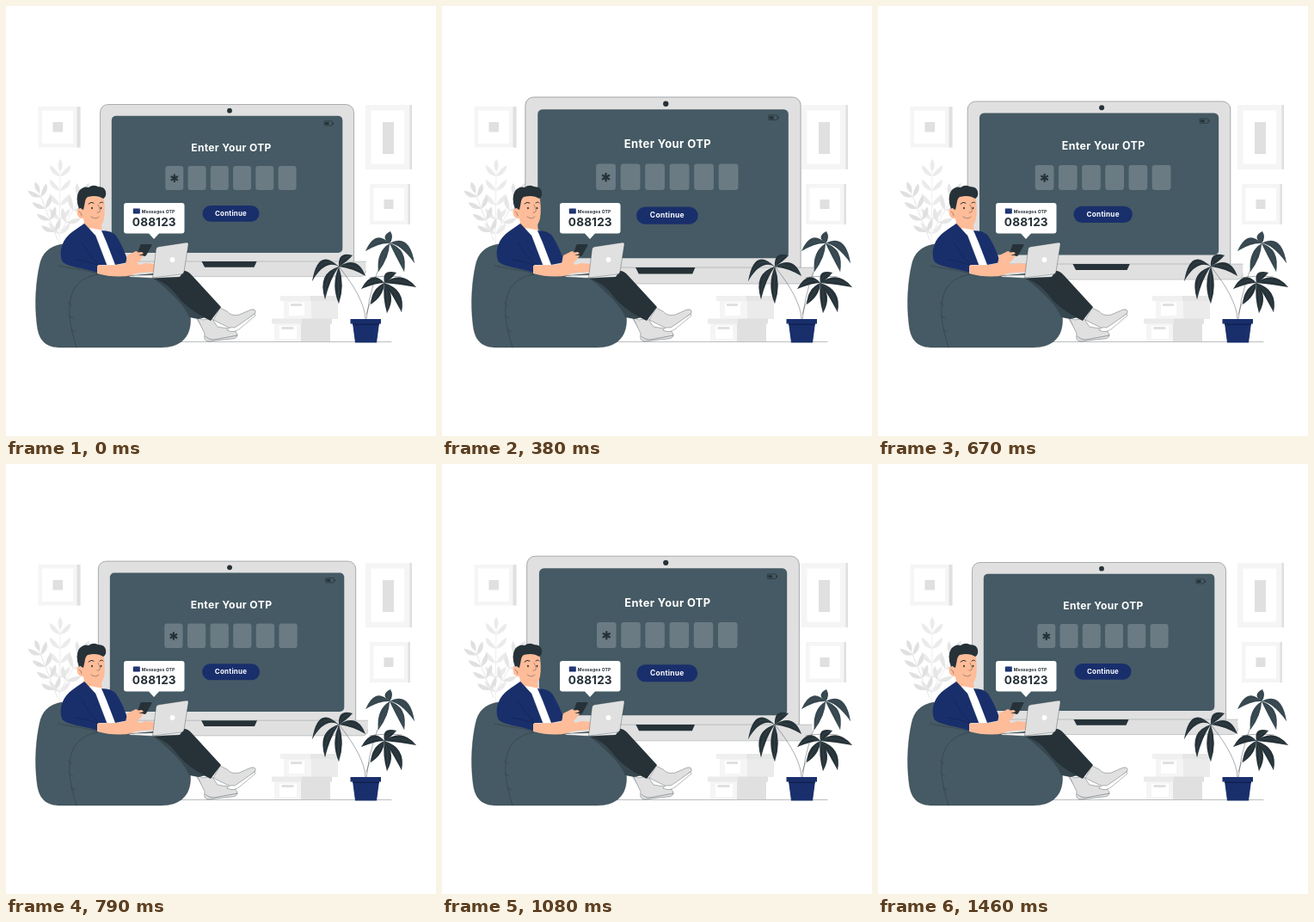
An HTML page for the animation above (1.5 s loop, 500 px wide and 500 px high).

```html
<!DOCTYPE html>
<html lang="en">
<head>
<meta charset="utf-8">
<title>Enter Your OTP</title>
<style>
html, body { margin: 0; width: 100%; height: 100%; overflow: hidden; background: #fff; }
svg { display: block; width: 100%; height: 100%; }
text { font-family: Inter, "Open Sans", sans-serif; font-weight: 700; text-anchor: middle; }
.line { fill: none; stroke: #263238; stroke-width: .4; stroke-linecap: round; stroke-linejoin: round; }
.skin { fill: #ffbc99; }
.navy { fill: #192f6c; }
.shoe { fill: #e0e0e0; stroke: #263238; stroke-width: .35; }
</style>
</head>
<body>
<svg viewBox="0 0 500 500">
  <g id="frames"></g>
  <g id="palePlant"></g>

  <!-- storage boxes -->
  <g>
    <path fill="#f5f5f5" d="M323 342H355V364H323Z"/>
    <path fill="#ebebeb" d="M355 342H386V364H355Z"/>
    <path fill="#f0f0f0" d="M319 337H354V343H319Z"/>
    <path fill="#e6e6e6" d="M354 337H387V343H354Z"/>
    <path fill="#fff" d="M329 345H347V360H329Z"/>
    <path fill="#e0e0e0" d="M331 346H344V349H331Z"/>
    <path fill="#f5f5f5" d="M312 369H343V390H312Z"/>
    <path fill="#e0e0e0" d="M343 369H377V390H343Z"/>
    <path fill="#ebebeb" d="M309 363.500H344V369.500H309Z"/>
    <path fill="#e0e0e0" d="M344 363.500H379V369.500H344Z"/>
    <path fill="#fff" d="M318 372H338V387H318Z"/>
    <path fill="#e0e0e0" d="M320.500 373H334.500V376H320.500Z"/>
  </g>
  <path class="line" d="M45 390.500H448" opacity=".8"/>

  <!-- big laptop -->
  <g id="screen">
    <rect x="109.500" y="114.500" width="295" height="190" rx="9" fill="#e0e0e0" stroke="#263238" stroke-width=".35"/>
    <rect x="122.800" y="127.700" width="268.500" height="159.300" rx="5" fill="#455a64"/>
    <circle cx="260" cy="121.700" r="2.900" fill="#263238"/>
    <rect x="370" y="133.800" width="9.500" height="5.200" rx="1" fill="none" stroke="#263238" stroke-width=".7"/>
    <path d="M371 135H375.500V138H371ZM380 135.500H381V137.500H380Z" fill="#263238"/>
    <text x="262" y="169" font-size="12" letter-spacing=".35" fill="#fff">Enter Your OTP</text>
    <g id="cells" fill="#6a7b83"></g>
    <path d="M195.800 195.600V205M191.700 198L199.900 202.700M199.900 198L191.700 202.700" stroke="#263238" stroke-width="2.100"/>
    <rect class="navy" x="228.500" y="232" width="66" height="18.700" rx="9.300"/>
    <text x="261.500" y="243.700" font-size="7.900" letter-spacing=".22" fill="#fff">Continue</text>
    <path d="M95.500 297H418.500V308Q418.500 314.500 412 314.500H102Q95.500 314.500 95.500 308Z" fill="#e0e0e0"/>
    <path class="line" d="M95.500 297H418.500M95.500 308Q95.500 314.500 102 314.500H412Q418.500 314.500 418.500 308" opacity=".5"/>
    <path d="M227.500 297H291.500L288.500 303.800H231Z" fill="#263238"/>
  </g>

  <!-- potted plant -->
  <g id="plant"></g>
  <path class="navy" d="M403 369H434L431 391.500H406Z"/>
  <path class="navy" d="M400.500 364H436V369.500H400.500Z"/>
  <path fill="#10214f" d="M403 369.500H434L433.800 371H403.200Z"/>

  <!-- bean bag -->
  <path fill="#455a64" stroke="#263238" stroke-width=".4" d="M65 277C50 280 42 287 39 302C35 320 33 345 36 370C38 389 46 397 64 397H180C202 397 215 386 214.500 364C213 341 196 323 172 316L105 309Z"/>
  <path class="line" d="M61 302C78 306 99 307 107 312C84 316 75 330 74 349S78 384 82 397M72 345L77 349M73 360L78 363M76 376L81 379"/>

  <!-- legs and shoes -->
  <path fill="#fff" stroke="#263238" stroke-width=".35" d="M220 361L236 360L246 381L232 379Z"/>
  <path class="shoe" d="M222 362L229 365L239 363L246 373L258 375Q268 377 269 382Q269 387 262 387L236 390Q229 390 231 381Z"/>
  <path class="line" d="M232 384Q235 388 242 388L269 383"/>
  <path fill="#37474f" d="M168 315L203 317L219 339L241 360L224 364L213 362Q207 345 172 317Z"/>
  <path class="shoe" d="M249 351L257 355Q262 361 271 359L285 353Q291 352 290 357L274 371Q268 377 261 375L241 365Z"/>
  <path fill="#fff" stroke="#263238" stroke-width=".35" d="M257 377Q258 373 266 374L272 370L289 358L290 360L272 375Q265 381 257 377Z"/>
  <path fill="#263238" d="M152 313L203 308Q211 307 216 313L250 350L238 366Q211 353 199 337Q188 322 172 317Z"/>

  <!-- man -->
  <path class="skin" d="M89 243L110 251L113 266L126 299L106 302L94 266Z"/>
  <path fill="#fff" d="M97 258L114 261L124 276L130 301L109 301Z"/>
  <path class="navy" d="M91 253Q85 257 78 262C66 270 61 284 65 296C70 304 90 304 106 310L107 301L117 301L104 267Z"/>
  <path class="navy" d="M111 261Q123 261 128 267Q137 281 142 298L127 301L117 275Z"/>
  <path class="line" d="M91 253L104 267L117 301M88 275Q96 289 107 300M82 295Q95 297 107 301" style="stroke:#0c1a43"/>
  <path class="skin" d="M106 302L131 301L150 297L154 300L156 304L147 313Q127 317 106 311Z"/>
  <path class="skin" d="M141 290L151 285L158 288L157 295L151 300L139 300Z"/>
  <path class="skin" d="M152 302L162 299L174 300L173 309L157 310L145 312Z"/>
  <path fill="#263238" d="M157 277H168.500Q170 277 169.300 278.500L163 290Q162 291 160.500 291H152L156 278.500Z"/>
  <path class="skin" d="M150 287L158 286L160 288L154 290L160 290L158 293L151 294Z"/>
  <path class="skin" d="M90 221L113 219Q116 235 114 247Q112 257 105 258Q96 256 91 247Q83 248 82.500 240Q83 233 88 236Z"/>
  <path fill="#263238" d="M85 236Q80 223 85 215Q90 209 96 211Q101 207 107 210Q115 210 116 216Q117 222 113 224Q106 219 95 222Q92 224 91.500 230L90 237L88 236Q86 234 85 236Z"/>
  <path class="line" d="M85 239Q88 240 88 244M107 231Q111 239 108 240L106 240M99 245Q104 249 108 245"/>
  <path class="line" style="stroke-width:1" d="M96 230Q99 227 102 229M109 229Q112 227 113 229"/>
  <g fill="#263238"><ellipse cx="100" cy="235" rx=".9" ry="1.300"/><ellipse cx="110.500" cy="235" rx=".9" ry="1.300"/></g>

  <!-- small laptop -->
  <path fill="#f5f5f5" stroke="#263238" stroke-width=".35" d="M144 313.500L172 312.500L205 311L202 315L172 316.500L143 315Z"/>
  <path fill="#e0e0e0" stroke="#263238" stroke-width=".35" d="M177 280L210 275Q212.500 275 212 277.500L207 309Q206.500 311.500 204 312L170.500 316L174.500 282.500Q175 280.500 177 280Z"/>
  <circle cx="193.500" cy="295" r="2.900" fill="#fff"/>

  <!-- message -->
  <path fill="#fff" d="M140 229H204.500Q207.500 229 207.500 232V261.500Q207.500 264.500 204.500 264.500H178L172 271L166 264.500H140Q137 264.500 137 261.500V232Q137 229 140 229Z"/>
  <rect class="navy" x="147.800" y="235.500" width="8" height="6" rx=".6"/>
  <path d="M148.200 236L151.800 239L155.400 236" fill="none" stroke="#6e7ca5" stroke-width=".4"/>
  <text x="177.200" y="240.800" font-size="5.100" letter-spacing=".12" fill="#263238">Messages OTP</text>
  <text x="172.300" y="256" font-size="13.600" letter-spacing=".15" fill="#263238">088123</text>
</svg>
<script>
const NS = "http://www.w3.org/2000/svg";
const byId = id => document.getElementById(id);

function add(parent, tag, attrs) {
  const el = document.createElementNS(NS, tag);
  for (const k in attrs) el.setAttribute(k, attrs[k]);
  return parent.appendChild(el);
}

function box(parent, x, y, width, height, fill) {
  add(parent, "rect", { x, y, width, height, fill });
}

// Leaf along a curved spine from base through a control point to the tip.
function leaf(parent, x, y, cx, cy, tx, ty, w, fill) {
  const len = Math.hypot(tx - x, ty - y);
  const nx = -(ty - y) / len * w, ny = (tx - x) / len * w;
  add(parent, "path", {
    fill,
    d: `M${x} ${y}Q${cx + nx} ${cy + ny} ${tx} ${ty}Q${cx - nx} ${cy - ny} ${x} ${y}Z`
  });
}

function wallFrame(x, y, w, h, side, pad, pic) {
  const g = byId("frames");
  box(g, x, y, w, h, "#f5f5f5");
  box(g, x + w - side, y, side, h, "#e0e0e0");
  box(g, x + pad, y + pad, w - side - 2 * pad, h - 2 * pad, "#fff");
  box(g, ...pic, "#e0e0e0");
}
wallFrame(37.5, 117, 49, 47.5, 4, 4.5, [54.5, 135, 11.5, 11.5]);
wallFrame(418, 115, 54, 75, 2.5, 6.5, [438, 135, 13, 37]);
wallFrame(423, 207, 47, 47, 2.5, 4.5, [439.5, 225, 11, 11]);

// Stem with leaf pairs and one leaf at its end
function branch(x, y, tx, ty, pairs, size, fill) {
  const g = byId("palePlant"), dir = Math.atan2(ty - y, tx - x);
  add(g, "path", { d: `M${x} ${y}L${tx} ${ty}`, stroke: fill, "stroke-width": .8 });
  const grow = (px, py, turn, len) => {
    const a = dir + turn, b = dir + turn * 1.3;
    leaf(g, px, py, px + len * .55 * Math.cos(b), py + len * .55 * Math.sin(b),
      px + len * Math.cos(a), py + len * Math.sin(a), 5.2, fill);
  };
  for (let i = 0; i < pairs; i++) {
    const f = (i + .7) / pairs, px = x + (tx - x) * f, py = y + (ty - y) * f;
    grow(px, py, -.75, size);
    grow(px, py, .75, size);
  }
  grow(tx, ty, 0, size * .85);
}
branch(62, 277, 63, 193, 5, 18, "#ebebeb");
branch(60, 272, 39, 218, 4, 17, "#e0e0e0");
branch(64, 262, 89, 219, 3, 18, "#e6e6e6");

// Dark plant: a hub, then control point and tip of each leaf
const plant = byId("plant");
add(plant, "path", { class: "line", d: "M418 364Q417 340 387 303M419 364Q424 318 446 277M419 358Q425 335 440 322M423 316Q438 313 460 315" });
const hubs = [
  ["#263238", 387, 303, [391, 291, 403, 290], [367, 287, 356, 320], [369, 314, 371, 341], [386, 325, 387, 346], [406, 297, 418, 314]],
  ["#37474f", 446, 276, [443, 269, 447, 262], [432, 267, 418, 285], [438, 289, 433, 309], [460, 286, 463, 309], [464, 270, 475, 299]],
  ["#263238", 440, 322, [442, 312, 454, 310], [428, 314, 413, 329], [432, 333, 424, 347], [446, 338, 443, 357], [458, 334, 460, 356], [459, 315, 477, 327]]
];
for (const [fill, x, y, ...leaves] of hubs) {
  for (const [cx, cy, tx, ty] of leaves) {
    leaf(plant, x, y, cx, cy, tx, ty, 8.5, fill);
    add(plant, "path", { d: `M${x} ${y}Q${cx} ${cy} ${tx} ${ty}`, fill: "none", stroke: "#546872", "stroke-width": .3 });
  }
}

for (let i = 0; i < 6; i++) {
  add(byId("cells"), "rect", { x: 185.3 + i * 26.25, y: 186, width: 21, height: 28, rx: 3 });
}

const LOOP = 1500, STEP = 125 / 3, LAST = 35;
const pulse = [[0, 1], [.2, 1.1], [.59, 1.003], [.8, 1.1], [1, 1]];

function scaleAt(p) {
  let i = 1;
  while (i < pulse.length - 1 && p > pulse[i][0]) i++;
  const [p0, s0] = pulse[i - 1], [p1, s1] = pulse[i];
  return s0 + (s1 - s0) * (p - p0) / (p1 - p0);
}

const screenEl = byId("screen");
function draw(t) {
  const k = Math.min(LAST, Math.floor((t % LOOP + 4.9) / STEP));
  const s = scaleAt(k / LAST);
  screenEl.setAttribute("transform", `translate(257 214.5) scale(${s}) translate(-257 -214.5)`);
}

const start = performance.now();
function tick() {
  draw(performance.now() - start);
  requestAnimationFrame(tick);
}
tick();
</script>
</body>
</html>
```
